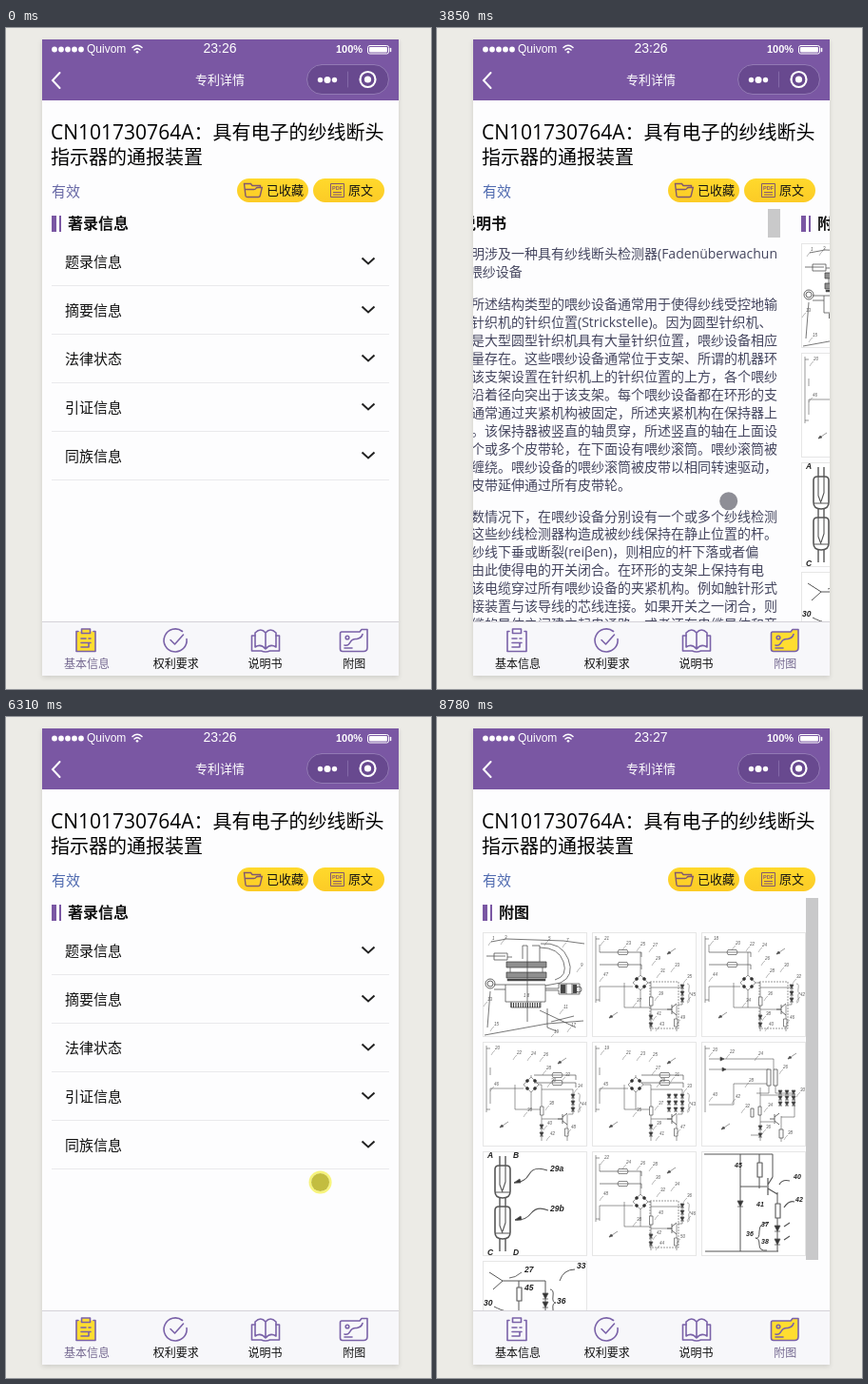
An HTML page for the animation above (9390 ms loop, 447 by 694 pixels).

```html
<!DOCTYPE html>
<html lang="zh-CN">
<head>
<meta charset="utf-8">
<title>专利详情</title>
<style>
html, body { margin: 0; width: 100%; height: 100%; overflow: hidden; background: #ecebe6; }
body { position: relative; color: #111; white-space: nowrap; text-spacing-trim: space-all;
  font-family: "Open Sans", "Noto Sans", "Noto Sans CJK SC", "Noto Sans CJK", sans-serif; }
div, svg.abs { position: absolute; }
svg { display: block; overflow: hidden; }
#phone { left: 38px; top: 12px; width: 375px; height: 668px; background: #fdfdfe; box-shadow: 0 2px 5px rgba(0,0,0,.13); }
#bar { left: 38px; top: 12px; width: 375px; height: 64px; background: #7a57a3; }
.top { color: #fff; line-height: 20px; }
#title { left: 47px; top: 97px; font-size: 20px; line-height: 26px; color: #000; }
#title span { font-size: 21px; line-height: 1; }
#state { left: 48px; top: 161px; font-size: 15px; line-height: 20px; }
.btn { top: 158px; width: 75px; height: 25px; border-radius: 13px; background: linear-gradient(#ffd92c, #fccb26); font-size: 13px; line-height: 25px; }
#view { left: 38px; top: 190px; width: 375px; height: 433px; overflow: hidden; }
#strip { left: 0; top: 0; width: 1500px; height: 433px; will-change: transform; }
.page { top: 0; width: 375px; height: 433px; overflow: hidden; }
.head { left: 10px; top: 5px; padding-left: 17px; font: bold 16px/20px "Open Sans", "Noto Sans CJK SC", "Noto Sans CJK", sans-serif; }
.head::before { content: ""; position: absolute; left: 0; top: 2px; width: 3px; height: 17px; border-left: 5px solid #7a57a3; border-right: 2px solid #7a57a3; }
.row { left: 10px; width: 355px; height: 50px; border-bottom: 1px solid #e9e9ec; font-size: 15px; line-height: 50px; text-indent: 14px; }
.copy { left: 10px; font-size: 14px; color: #45465f; white-space: pre; }
.thumb { width: 108px; height: 108px; border: 1px solid #e6e6e6; background: #fff; }
.thumb svg { margin: -1px; stroke: #555; stroke-linejoin: round; }
.thumb text { stroke: none; fill: #555; font: italic 4.5px "Liberation Sans", Arial, sans-serif; }
.thumb text.mid { fill: #222; font: italic bold 7px "Liberation Sans", Arial, sans-serif; }
.thumb text.big { fill: #222; font: italic bold 8.5px "Liberation Sans", Arial, sans-serif; }
.scroll { top: 0; left: 350px; width: 13px; background: #c9c9ca; }
#tabs { left: 38px; top: 623px; width: 375px; height: 56px; background: #f7f7fa; border-top: 1px solid #d4d2d8; }
.tab { top: 0; width: 94px; height: 56px; text-align: center; font-size: 12px; }
.tab div { left: 0; width: 94px; top: 35px; line-height: 18px; }
.tab svg { position: absolute; left: 29px; top: 3px; fill: none; stroke: #7a62a8; stroke-width: 1.6; stroke-linecap: round; stroke-linejoin: round; }
.tab.on { color: #73678f; }
.tab.on .fill { fill: #ffdd30; }
.tab.on .ring { fill: #ffdd30; stroke: #e9c63f; stroke-width: 1; }
#cursor { left: -9.5px; top: -9.5px; width: 19px; height: 19px; border-radius: 50%; background: rgba(75,75,85,.62); }
#cursor.down { background: rgba(185,178,30,.85); box-shadow: 0 0 0 2.5px rgba(245,240,80,.75); }
</style>
</head>
<body>
<div id="phone"></div>
<div id="bar"></div>
<svg class="abs" width="447" height="80" fill="none" stroke="#fff" stroke-linecap="round">
  <g id="dots" fill="#fff" stroke="none"></g>
  <path d="M133 20.5q5-4.5 10 0M135 23q3-2.600 6 0" stroke-width="1.600"/><circle cx="138" cy="25.300" r="1.300" fill="#fff" stroke="none"/>
  <rect x="380.500" y="18.500" width="22" height="8.500" rx="2"/><rect x="382" y="20" width="19" height="5.500" rx="1" fill="#fff" stroke="none"/><path d="M404.500 21.500v3" stroke-width="1.500"/>
  <path d="M56.500 47l-7.500 8 7.500 8" stroke-width="2"/>
  <rect x="316.500" y="38.500" width="86" height="31" rx="15.500" fill="#68498f" stroke="#9279b4"/><path d="M359.500 46v16" stroke="#8469a8"/>
  <g fill="#fff" stroke="none"><circle cx="330.500" cy="54.500" r="2.700"/><circle cx="338" cy="54.500" r="3.500"/><circle cx="345.500" cy="54.500" r="2.700"/><circle cx="380.500" cy="54" r="3.600"/></g>
  <circle cx="380.500" cy="54" r="8" stroke-width="2.200"/>
</svg>
<div class="top" style="left:85px;top:12px;font:12px/20px 'Liberation Sans',sans-serif">Quivom</div>
<div class="top" id="clock" style="left:195px;width:60px;top:11px;text-align:center;font:14px/21px 'Liberation Sans',sans-serif">23:26</div>
<div class="top" style="left:347px;top:12px;font:bold 11px/20px 'Liberation Sans',sans-serif">100%</div>
<div class="top" style="left:185px;width:80px;top:44px;text-align:center;font-size:13px;font-weight:500">专利详情</div>

<div id="title"><span>CN101730764A</span>：具有电子的纱线断头<br>指示器的通报装置</div>
<div id="state">有效</div>
<div class="btn" style="left:243px;text-indent:31px">已收藏</div>
<div class="btn" style="left:323px;text-indent:37px">原文</div>
<svg class="abs" style="top:158px" width="447" height="25" fill="none" stroke="#82586f" stroke-width="1.400">
  <path d="M252 18.500l-1.500-13h7l1.500 2h8.500v2M252 18.500q.5 1 2 1h11.500q1.500 0 1.800-1.500l2-8.500h-4.500q-1.500 0-2 1-.5 1-2 1h-9.500"/>
  <path d="M341.500 5.500h14v14h-14zM344 14.500h9M344 17h9" stroke-width="1"/>
  <text x="343" y="12" font-family="Liberation Sans, sans-serif" font-size="5.500" font-weight="bold" fill="#82586f" stroke="none">PDF</text>
</svg>

<div id="view"><div id="strip">
  <div class="page" id="basic"><div class="head">著录信息</div></div>
  <div class="page" style="left:375px"><div class="head">权利要求</div>
<div class="copy" style="top:36px;line-height:24px">1.一种通报装置(23)，特别是用于皮带驱动的喂纱设备(1)
或其它纺织技术的装置，具有：保持器(5)，其被设计用于
通过固定装置(4)固定在纺织机器上；电的连接装置(24)，
其用于在通报装置(23)与外部导线(18)之间建立起电连
接；与连接装置(24)连接的电流源电路(33)，其用于使得
一个或多个光源(36、46)工作，所述光源用于指示目的。
2.如权利要求1所述的通报装置，其特征在于，在连接装
置(24)与电流源电路(33)之间设置有整流器装置(27)。3.如
权利要求1所述的通报装置，其特征在于，整流器电路(2
7)是全波桥式整流器电路(28)。4.如权利要求1所述的通报
装置，其特征在于，为了使得光源(36)的电流回路断开和
闭合，设置有至少一个开关(29)。5.如权利要求2和4所述
的通报装置，其特征在于，开关(29)设置在连接装置(24)
与整流器装置(27)之间。6.如权利要求2所述的通报装置，
其特征在于，开关(29)设置在整流器电路(27)与电流源电
路(33)之间。7.如权利要求2所述的通报装置，其特征在
于，开关(29)设置在电流源电路(33)中。8.如权利要求1所</div>
    <div class="scroll" style="height:227px"></div></div>
  <div class="page" style="left:750px"><div class="head">说明书</div>
<div class="copy" style="top:36.500px;line-height:19px">本发明涉及一种具有纱线断头检测器(Fadenüberwachun
g)的喂纱设备</div>
<div class="copy" style="top:89.500px;line-height:19px">这里所述结构类型的喂纱设备通常用于使得纱线受控地输
送给针织机的针织位置(Strickstelle)。因为圆型针织机、
特别是大型圆型针织机具有大量针织位置，喂纱设备相应
地大量存在。这些喂纱设备通常位于支架、所谓的机器环
上，该支架设置在针织机上的针织位置的上方，各个喂纱
设备沿着径向突出于该支架。每个喂纱设备都在环形的支
架上通常通过夹紧机构被固定，所述夹紧机构在保持器上
构造。该保持器被竖直的轴贯穿，所述竖直的轴在上面设
有一个或多个皮带轮，在下面设有喂纱滚筒。喂纱滚筒被
纱线缠绕。喂纱设备的喂纱滚筒被皮带以相同转速驱动，
所述皮带延伸通过所有皮带轮。</div>
<div class="copy" style="top:313.500px;line-height:18.900px">大多数情况下，在喂纱设备分别设有一个或多个纱线检测
器，这些纱线检测器构造成被纱线保持在静止位置的杆。
如果纱线下垂或断裂(reiβen)，则相应的杆下落或者偏
移。由此使得电的开关闭合。在环形的支架上保持有电
缆，该电缆穿过所有喂纱设备的夹紧机构。例如触针形式
的连接装置与该导线的芯线连接。如果开关之一闭合，则
在电缆的导体之间建立起电通路，或者还在电缆导体和旁</div>
    <div class="scroll" style="height:30px"></div></div>
  <div class="page" id="figures" style="left:1125px"><div class="head">附图</div></div>
</div></div>

<div id="tabs"></div>
<div id="cursor"></div>

<script>
const $ = id => document.getElementById(id);
const add = (el, html) => el.insertAdjacentHTML('beforeend', html);

for (let i = 0; i < 5; i++) $('dots').innerHTML += `<circle cx="${51 + i * 7}" cy="22.500" r="2.900"/>`;

['题录信息', '摘要信息', '法律状态', '引证信息', '同族信息'].forEach((name, i) => add($('basic'),
  `<div class="row" style="top:${30 + i * 51}px">${name}<svg class="abs" style="left:325px;top:20px" width="16" height="10" fill="none" stroke="#222" stroke-width="2"><path d="M1.500 1.500l6.500 6 6.500-6"/></svg></div>`));

// Tab bar
const icons = [
  '<path class="fill" d="M9 6.500h-2v21h20v-21h-2"/><path class="fill" d="M12.500 4h9v4.500h-9z"/><path d="M12 14h5M20 14h2M12 18.500h10M12 23h7M20 19v4"/>',
  '<path class="ring" d="M24.500 6.500A12 12 0 1 0 29 14.500"/><path d="M12 15.500l4.500 4.500 9-10"/>',
  '<path class="fill" d="M18 8q-5-6-11 0v15q6-4 11 2 5-6 11-2v-15q-6-6-11 0v17"/><path d="M7 11h-3.500v16h10q4.500 2 9 0h10v-16h-3.500"/>',
  '<path class="fill" d="M5 7h19l2-2.500h6v19q0 4-4 4h-22q-2.500 0-2.500-2.500v-16q0-2 1.500-2z"/><path d="M8 21q4 1 6-3t7-3.500q5-1 6-5M8 24h8"/><circle cx="11" cy="13" r="1.800"/>'
];
['基本信息', '权利要求', '说明书', '附图'].forEach((name, i) => add($('tabs'),
  `<div class="tab" style="left:${i * 93.75}px"><svg width="36" height="32">${icons[i]}</svg><div>${name}</div></div>`));
const tabs = [...document.querySelectorAll('.tab')];

// Patent figures
const path = (d, w = .6, fill = 'none', more = '') => `<path d="${d}" stroke-width="${w}" fill="${fill}" ${more}/>`;
const box = (x, y, w, h) => `M${x} ${y}h${w}v${h}h${-w}z`;
const ring = (x, y, r) => `M${x - r} ${y}a${r} ${r} 0 1 0 ${2 * r} 0a${r} ${r} 0 1 0 ${-2 * r} 0`;
const diode = (x, y, s = 2) => path(`M${x - s} ${y - s}h${2 * s}l${-s} ${2 * s}zM${x - s} ${y + s}h${2 * s}`, .8, '#333');
const label = (x, y, s, size = '') => `<text x="${x}" y="${y}" class="${size}">${s}</text>`;
const tags = (pts, n) => pts.map(([x, y], i) => label(x, y, n + i * 2) + path(`M${x} ${y + 1}q-2 1-4 5`, .4)).join('');
const arrow = (x, y) => path(`M${x} ${y}l-9 6M${x - 9} ${y + 6}l4-1-2-2z`, .6, '#444');
const transistor = (x, y, s = 1) => path(`M${x} ${y - 5 * s}v${10 * s}M${x - 5 * s} ${y}h${5 * s}M${x} ${y - 2 * s}l${5 * s} ${-4 * s}M${x} ${y + 2 * s}l${5 * s} ${4 * s}`, .9 * s);

function circuit({ bx, by, fuses, cols = 1, dash, n }) {
  const mid = 62, right = 95;
  let s = path(`M4 4v70M4 7h4M4 71h4M8 ${by + 20}v-16H${bx - 8}M8 ${fuses[0][1]}v-8M${bx} ${by + 8}v18H34v-26`);
  s += path(`M${bx} ${by - 8}l8 8-8 8-8-8zM${bx} ${by - 8}V${fuses[0][1]}M${bx + 8} ${by}H${mid}V104M${mid} ${by + 5}H${right}V76H${right - 5}M${mid} 81H84M89 76v28M${bx} ${by + 26}H${mid}`);
  s += path([[-4, -4], [4, -4], [-4, 4], [4, 4]].map(([x, y]) => `M${bx + x - 2} ${by + y}l2-2 2 2-2 2z`).join(''), .6, '#333');
  for (const [x, y] of fuses) s += path(`M${x - 18} ${y}h18m13 0h13v5M${x} ${y}h13M${x + 2} ${y - 2.5}h9q2 2.500 0 5h-9q-2-2.500 0-5`, .7);
  for (let c = 0; c < cols; c++) for (let y = 57; y < 76; y += 7) s += diode(right - c * 7, y);
  if (dash) s += path(box(61, 52, 30, 49), .6, 'none', 'stroke-dasharray="2 1"');
  s += path(box(60.5, 68, 3.5, 9) + box(86.5, 91, 3.5, 8), .7, '#fff') + diode(62, 89) + diode(62, 97) + transistor(84, 81);
  s += path(`M100 54q3 0 2 5t2 5q-3 0-2 5t-2 5`, .5) + arrow(27, 84) + arrow(88, 17);
  return s + tags([[13, 8], [36, 13], [51, 14], [64, 15], [67, 29], [72, 42], [87, 36], [100, 48], [47, 73], [70, 66], [68, 87], [71, 98], [104, 67], [12, 46], [93, 91]], n);
}

const left = [[26, 21], [26, 34]];
function machine() {
  let s = path(`M9 10l16-3 60 2 22 3M12 22h14v7h-14zM4 25h20M26 26h5M42 28V14h5V94M60 31V14h-8M25 31h42v6h-42zM25 42h42v6h-42zM29 37v5M63 37v5M24 55h42v18h-42zM30 73v6h31v-6M61 12q22-2 29 16t-8 25l-16 3M60 16q20 0 25 15t-9 19M66 59h14v-5h22v11h-22v-4H66M88 54v11M94 54v11M12 55h12M12 60h12M8 62l-3 38M68 80v20l10 4M60 82l38 18M72 94l24-6M2 108l66-12 38-3`, .8);
  s += path(ring(8, 54, 5) + ring(8, 54, 3) + ring(101, 60, 3), .9);
  let hatch = '';
  for (let x = 26; x < 67; x += 2) hatch += `M${x} 31v6M${x} 42v6`;
  for (let x = 30; x < 62; x += 2.5) hatch += `M${x} 74v5`;
  s += path(hatch, 1.1, 'none', 'stroke="#333"') + path('M82 55h5v9h-5zM95 55h4v9h-4zM26 49h40v2H26z', .5, '#444');
  return s + label(43, 68, '1 8') + tags([[10, 8], [23, 7], [69, 8], [88, 10], [103, 36], [85, 80], [5, 72], [12, 98], [93, 99], [75, 106]], 1);
}
function tall() {
  let s = path('M4 4v70M4 7h5M8 18H76V29M8 29H71V30M8 66h26V44H70M62 48V104M62 56H98M71 46V54H58M78 46v8H98V79H84M62 84H76M84 78v27M62 98H52');
  s += path(box(69, 29, 4, 17) + box(76, 29, 4, 17) + box(52, 70, 3, 9) + box(60, 68, 3, 9) + box(82, 92, 4, 9), .8, '#fff');
  for (let y = 53; y < 69; y += 6) for (let x = 83; x < 103; x += 7) s += diode(x, y);
  s += path('M20 16l4 2-4 2zM22 27l4 2-4 2z', .7, '#333') + diode(62, 90) + diode(62, 98) + transistor(77, 81);
  return s + arrow(30, 86) + arrow(100, 12) + tags([[12, 10], [30, 12], [60, 14], [86, 28], [50, 42], [104, 52], [46, 69], [70, 68], [68, 91], [91, 97], [12, 57], [36, 59]], 20);
}
function reeds() {
  let s = path('M18 5v10M24 5v10M18 48v10M24 48v10M18 92v13M24 92v13', 1.4);
  for (const y of [15, 58]) s += path(`M13 ${y + 4}q0-4 4-4h8q4 0 4 4v23q0 7-8 7t-8-7z`, 1.6) + path(`M18 ${y}v20l3 8M24 ${y}v17l-3 9M14 ${y + 28}h14`, 1.1);
  s += path('M68 20q-14-5-19 4t-16 9M69 62q-12-5-18 3t-17 7', 1.1) + path('M33 33l6-4 1 4zM34 72l6-4 1 4z', .8, '#333');
  const text = [[5, 7, 'A'], [32, 7, 'B'], [5, 109, 'C'], [32, 109, 'D'], [71, 21, '29a'], [71, 63, '29b']];
  return s + text.map(([x, y, name]) => label(x, y, name, 'big')).join('');
}
function driver() {
  let s = path('M3 3H75V27M4 105H81M41 3v102M61 3v36M41 37H69M80 43v62M70 75q-9 0-9 9t-4 7q4 0 4 7t8 6', 1);
  s += path(box(59, 12, 5, 15) + box(78, 55, 5, 15), 1.1, '#fff') + diode(41, 55, 3) + diode(80, 81, 3) + diode(80, 95, 3);
  s += path('M70 28v18M70 35l5-8M70 39l10 6M87 79l6-4M87 93l6-4M93 31q-8-2-11 4M98 53q-6-2-11 6', 1.2);
  const text = [[35, 17, 45], [97, 29, 40], [58, 58, 41], [99, 53, 42], [47, 89, 36], [63, 79, 37], [63, 97, 38]];
  return s + text.map(([x, y, name]) => label(x, y, name, 'mid')).join('');
}
function fork() {
  let s = path('M7 12l14 9-10 9M21 21H66V70M38 21V70M12 48q8 4 10 4M97 9q-12 0-16 12M71 30q4 0 3 7t3 7q-4 0-3 7t-3 6', 1);
  s += path(box(36, 28, 5, 14), 1.1, '#fff') + diode(66, 37, 3) + diode(66, 46, 3) + path('M28 18q6 0 13-6', .9);
  const text = [[44, 12, 27], [99, 8, 33], [44, 31, 45], [78, 45, 36], [1, 47, 30]];
  return s + text.map(([x, y, name]) => label(x, y, name, 'big')).join('');
}
const figures = [
  machine(),
  circuit({ bx: 51, by: 53, fuses: left, dash: true, n: 21 }),
  circuit({ bx: 49, by: 53, fuses: left, dash: true, n: 18 }),
  circuit({ bx: 51, by: 45, fuses: [[72, 35], [72, 43]], n: 20 }),
  circuit({ bx: 46, by: 45, fuses: [[70, 35], [70, 43]], cols: 3, n: 19 }),
  tall(), reeds(),
  circuit({ bx: 51, by: 53, fuses: left, dash: true, n: 22 }),
  driver(), fork()
];
figures.forEach((art, i) => add($('figures'),
  `<div class="thumb" style="left:${10 + i % 3 * 115}px;top:${36 + Math.floor(i / 3) * 115}px"><svg width="110" height="110">${art}</svg></div>`));
add($('figures'), '<div class="scroll" style="height:380px"></div>');

// Motion
const LOOP = 9390;
const ease = {
  lin: u => u,
  out: u => 1 - (1 - u) ** 3,
  io: u => u < .5 ? 4 * u ** 3 : 1 - 4 * (1 - u) ** 3,
  soft: u => u * u * (3 - 2 * u)
};
// [time, value, easing towards it]
const scrollX = [
  [1300, 0], [1800, 375, 'io'], [1908, 375], [2408, 750, 'io'], [2644.5, 750], [3144.5, 1125, 'io'],
  [3420, 1125], [3650, 1010, 'soft'], [4060, 750, 'out'], [4560, 750], [4760, 640, 'soft'], [5160, 383, 'out'], [5240, 375],
  [5400, 375], [5650, 150, 'soft'], [6030, 0, 'out'], [6310, 0], [6450, 110, 'soft'], [6800, 375, 'out'],
  [6880, 375], [7120, 570, 'soft'], [7160, 593], [7500, 750, 'out'], [7650, 750], [7820, 870, 'soft'], [8190, 1125, 'out']
];
const cursorX = [
  [300, 120], [900, 179, 'soft'], [1320, 179], [1880, 272, 'soft'], [1960, 276], [2150, 294], [2600, 366, 'soft'], [2680, 366],
  [2920, 265, 'soft'], [3420, 205, 'soft'], [3650, 320, 'soft'], [4460, 221, 'soft'], [4560, 221], [4760, 331, 'soft'],
  [5160, 156, 'soft'], [5400, 180], [5650, 406, 'soft'], [6310, 330, 'soft'], [6450, 220, 'soft'], [6880, 317, 'soft'],
  [7120, 112, 'soft'], [7160, 99], [7650, 320, 'soft'], [7820, 200, 'soft'], [8700, 240, 'soft']
];
const cursorY = [
  [300, 679], [900, 670, 'soft'], [1960, 668], [2150, 669], [2680, 667], [2920, 679, 'soft'], [3420, 500, 'soft'],
  [4540, 490], [5160, 494], [6310, 488], [7160, 483], [7820, 488], [8700, 560, 'soft']
];
const tabAt = [[0, 0], [1300, 1], [1908, 2], [2645, 3], [4050, 2], [5080, 1], [6000, 0], [6780, 1], [7480, 2], [8160, 3]];
const presses = [[1220, 1380], [1860, 2000], [2600, 2740], [3400, 3650], [4500, 4760], [5390, 5650], [6300, 6450], [6870, 7100], [7640, 7820]];

// [first change, last change, number of changes]
const bursts = [[210, 1130, 13], [1300, 2230, 13], [2300, 3230, 13], [3300, 4160, 12], [4240, 5160, 13],
  [5230, 6160, 13], [6230, 7160, 13], [7230, 8090, 12], [8170, 8780, 9]];
const ticks = [0];
for (const [a, b, n] of bursts)
  for (let i = 0; i < n; i++) ticks.push(Math.floor((a + (b - a) * i / (n - 1) + .001) / 10) * 10);

function at(track, t) {
  const i = track.findIndex(k => k[0] > t);
  if (i === 0) return track[0][1];
  if (i < 0) return track[track.length - 1][1];
  const [t0, v0] = track[i - 1], [t1, v1, e = 'lin'] = track[i];
  return v0 + (v1 - v0) * ease[e]((t - t0) / (t1 - t0));
}
const last = (list, f) => list.filter(f).pop();

function draw(t) {
  $('strip').style.transform = `translateX(${-Math.round(at(scrollX, t))}px)`;
  const active = last(tabAt, k => k[0] <= t)[1];
  tabs.forEach((tab, i) => tab.classList.toggle('on', i === active));
  const c = $('cursor');
  c.style.visibility = t >= 300 && t < 8700 ? 'visible' : 'hidden';
  c.style.transform = `translate(${at(cursorX, t)}px, ${at(cursorY, t)}px)`;
  c.classList.toggle('down', presses.some(([a, b]) => t >= a && t < b));
  $('clock').textContent = t < 7690 ? '23:26' : '23:27';
  $('state').style.color = t < 300 ? '#6869a6' : '#506bb0';
}

const start = performance.now();
function loop() {
  const now = (performance.now() - start) % LOOP;
  draw(last(ticks, k => k <= now));
  requestAnimationFrame(loop);
}
loop();
</script>
</body>
</html>
```
